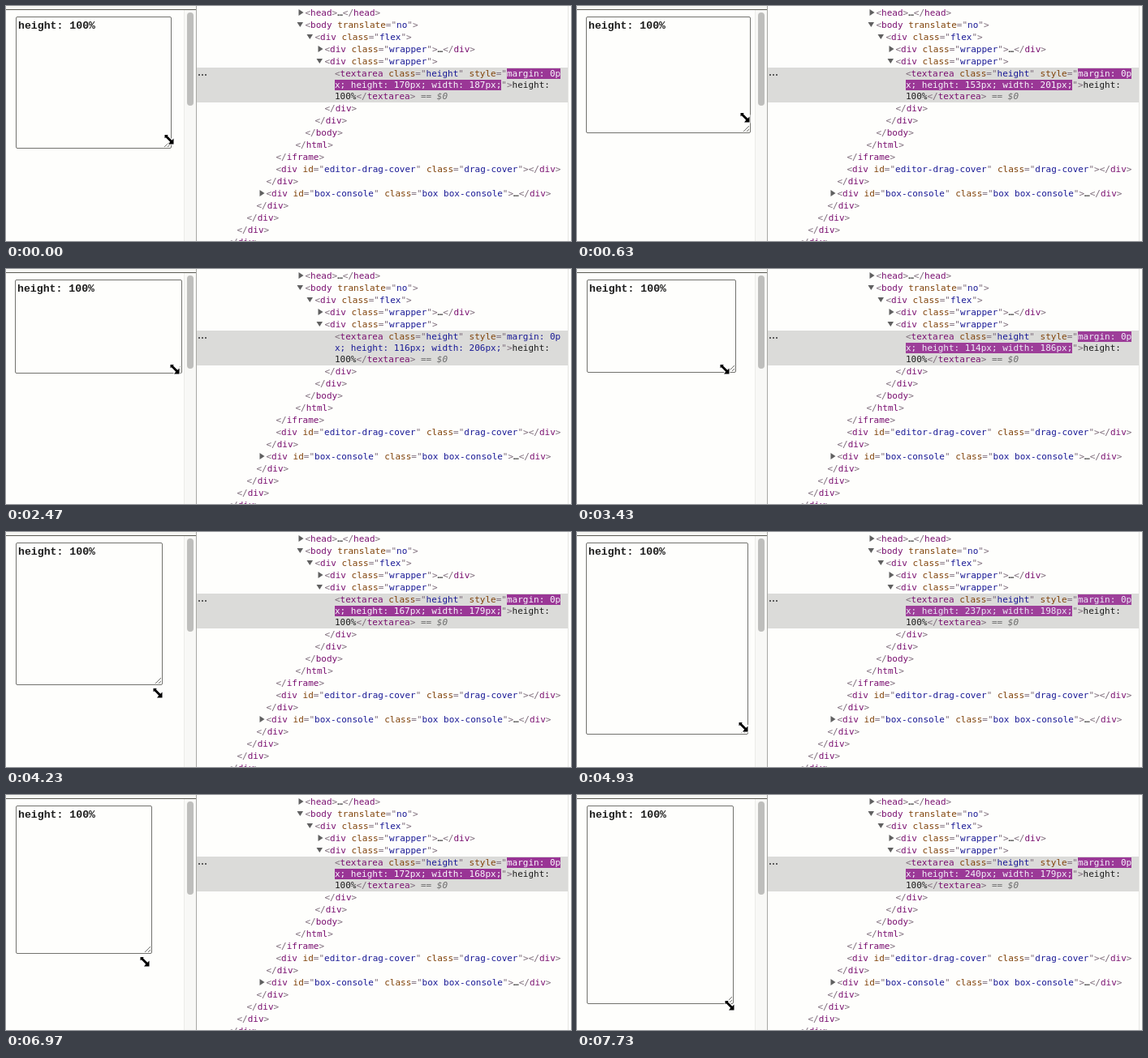
An HTML page with a canvas for the animation above (7760 ms loop, 696x290 px).

```html
<!DOCTYPE html>
<html lang="en">
<head>
<meta charset="utf-8">
<title>Resizing a textarea</title>
<style>
  html, body { margin: 0; width: 100%; height: 100%; overflow: hidden; background: #fefefc; }
  canvas { display: block; }
</style>
</head>
<body>
<canvas id="stage" width="696" height="290"></canvas>
<script>
const ctx = document.getElementById('stage').getContext('2d');
const LOOP = 7760;
const LAG = 62;     // the inspector trails the box
const LEAD = 110;   // the pointer runs ahead of it
const FADE = 1400;  // life of an update flash
const PAGE = '#fefefc';
const ROW = [219, 219, 217];
const FLASH = [152, 50, 148];
const VALUE = [26, 26, 150];
const MONO = '"DejaVu Sans Mono", monospace';
const CHAR = 6.622;
const INK = {
  punct: '#7d6c7a', tag: '#7a1070', attr: '#80430a', value: `rgb(${VALUE})`,
  plain: '#1c1c1c', note: '#6c6c6c'
};

// time and place of the dragged corner
const path = [
  [-200, 190, 196], [0, 204, 176], [150, 210, 170], [400, 208, 184], [630, 214, 157],
  [950, 217, 129], [2800, 217, 129], [3850, 184, 140], [4230, 193, 189], [4900, 210, 250],
  [5670, 222, 181], [6500, 190, 112], [6970, 180, 196], [7730, 193, 258], [7950, 200, 266]
];

function slope(i, axis) {
  if (!i || i === path.length - 1) return 0;
  const [before, here, after] = [path[i - 1], path[i], path[i + 1]];
  const turns = (here[axis] - before[axis]) * (after[axis] - here[axis]) <= 0;
  return turns ? 0 : 1.3 * (after[axis] - before[axis]) / (after[0] - before[0]);
}

function corner(t) {
  let i = 0;
  while (i < path.length - 2 && path[i + 1][0] <= t) i++;
  const a = path[i], b = path[i + 1], span = b[0] - a[0];
  const u = Math.min(1, Math.max(0, (t - a[0]) / span)), v = 1 - u;
  return [1, 2].map(k => v * v * (1 + 2 * u) * a[k] + u * u * (3 - 2 * u) * b[k]
    + span * u * v * (v * slope(i, k) - u * slope(i + 1, k)));
}

// time since the size last changed visibly
function flashAge(t) {
  const [x, y] = corner(t);
  for (let age = 0; age < FADE; age += 20) {
    const [px, py] = corner(t - age);
    if (Math.hypot(px - x, py - y) > 4) return age;
  }
  return FADE;
}

const mix = (a, b, k) => `rgb(${a.map((n, i) => Math.round(n + (b[i] - n) * k))})`;

function rect(x, y, w, h, color) {
  ctx.fillStyle = color;
  ctx.fillRect(x, y, w, h);
}

function polygon(points, color) {
  ctx.fillStyle = color;
  ctx.beginPath();
  points.forEach(p => ctx.lineTo(...p));
  ctx.fill();
}

// arguments alternate between ink and text
function write(x, y, ...pieces) {
  ctx.font = '11px ' + MONO;
  for (let i = 0; i < pieces.length; i += 2) {
    ctx.fillStyle = INK[pieces[i]] || pieces[i];
    ctx.fillText(pieces[i + 1], x, y);
    x += pieces[i + 1].length * CHAR;
  }
}

function markup(x, y, source) {
  const pieces = [];
  for (const m of source.matchAll(/(<\/?)(\w+)|([\w-]+)(=")([^"]*)(")|[\s\S]/g)) {
    if (m[2]) pieces.push('punct', m[1], 'tag', m[2]);
    else if (m[3]) pieces.push('attr', m[3], 'punct', m[4], 'value', m[5], 'punct', m[6]);
    else pieces.push(m[0] === '…' ? 'plain' : 'punct', m[0]);
  }
  write(x, y, ...pieces);
}

const above = `
        <head>…</head>
        <body translate="no">
         <div class="flex">
          <div class="wrapper">…</div>
          <div class="wrapper">`;
const below = `
          </div>
         </div>
        </body>
       </html>
     </iframe>
     <div id="editor-drag-cover" class="drag-cover"></div>
    </div>
    <div id="box-console" class="box box-console">…</div>
   </div>
  </div>
 </div>
</div>`;

function tree(source, top) {
  source.split('\n').slice(1).forEach((row, i) => {
    const text = row.trim();
    const x = 272.5 + 12 * (row.length - text.length), y = top + 15 * i;
    markup(x, y, text);
    if (text.includes('…'))
      polygon([[x - 8, y - 8], [x - 8, y], [x - 2, y - 4]], '#606060');
    else if (!text.includes('</'))
      polygon([[x - 10, y - 7], [x - 2.5, y - 7], [x - 6.2, y - 1]], '#606060');
  });
}

function inspector(width, height, age) {
  rect(234, 0, 462, 290, PAGE);
  rect(234, 0, 1, 290, '#a8a8a4');
  rect(692, 0, 1, 290, '#e6e6e2');
  rect(235, 76, 457, 43, `rgb(${ROW})`);
  tree(above, 12);
  tree(below, 130);
  for (let i = 0; i < 3; i++) rect(237 + 4 * i, 84, 2, 2, '#5c5c5c');

  const k = age / FADE;
  const fill = mix(FLASH, ROW, k), ink = mix([255, 255, 255], VALUE, k);
  rect(617, 77, 66, 13, fill);
  rect(405, 91, 205, 13, fill);
  write(405, 87, 'punct', '<', 'tag', 'textarea', 'attr', ' class', 'punct', '="', 'value', 'height',
    'punct', '"', 'attr', ' style', 'punct', '="', ink, 'margin: 0p');
  write(405, 101, ink, `x; height: ${height}px; width: ${width}px;`, 'punct', '">', 'plain', 'height:');
  write(405, 115, 'plain', '100%', 'punct', '</', 'tag', 'textarea', 'punct', '>', 'note', ' == ');
  ctx.font = 'italic 11px ' + MONO;
  ctx.fillStyle = INK.note;
  ctx.fillText('$0', 405 + 19 * CHAR, 115);
}

function preview(left, right, bottom) {
  rect(0, 0, 234, 290, PAGE);
  ctx.strokeStyle = '#72726e';
  ctx.lineWidth = 1;
  ctx.beginPath();
  ctx.roundRect(left + .5, 13.5, right - left - 1, bottom - 14, 1.5);
  for (const d of [8, 4]) {
    ctx.moveTo(right - d - 1, bottom - 2);
    ctx.lineTo(right - 2, bottom - d - 1);
  }
  ctx.stroke();
  ctx.font = 'bold 13.2px "Liberation Mono", monospace';
  ctx.fillStyle = '#1c1c1c';
  ctx.fillText('height: 100%', left + 3, 28);

  rect(0, 0, 234, 4, '#f8f8f4');
  rect(0, 4, 234, 1, '#5c5c54');
  rect(220, 5, 14, 285, '#f8f8f6');
  rect(219, 5, 1, 285, '#ebebe8');
  ctx.fillStyle = '#bebebc';
  ctx.beginPath();
  ctx.roundRect(223, 8, 8, 115, 4);
  ctx.fill();
}

const arrow = new Path2D('M5.5 6V-1L3.3 1.2-2.2-4.3-1.2-5.6H-5.5V-1.3L-4.2-2.3 1.2 3.2-1 6Z');

function pointer(x, y) {
  ctx.save();
  ctx.translate(x, y);
  ctx.strokeStyle = '#fff';
  ctx.lineWidth = 2;
  ctx.stroke(arrow);
  ctx.fillStyle = '#000';
  ctx.fill(arrow);
  ctx.restore();
}

function draw(t) {
  const [right, bottom] = corner(t).map(Math.round);
  const [shownRight, shownBottom] = corner(t - LAG).map(Math.round);
  const [x, y] = corner(t + LEAD).map(Math.round);
  const left = right > 208 ? 11 : 12;
  preview(left, right, bottom);
  inspector(shownRight - left, shownBottom - 13, flashAge(t - LAG));
  pointer(x - 9, y - 5.5);
}

const start = performance.now();
function tick() {
  draw((performance.now() - start) % LOOP);
  requestAnimationFrame(tick);
}
tick();
</script>
</body>
</html>
```
